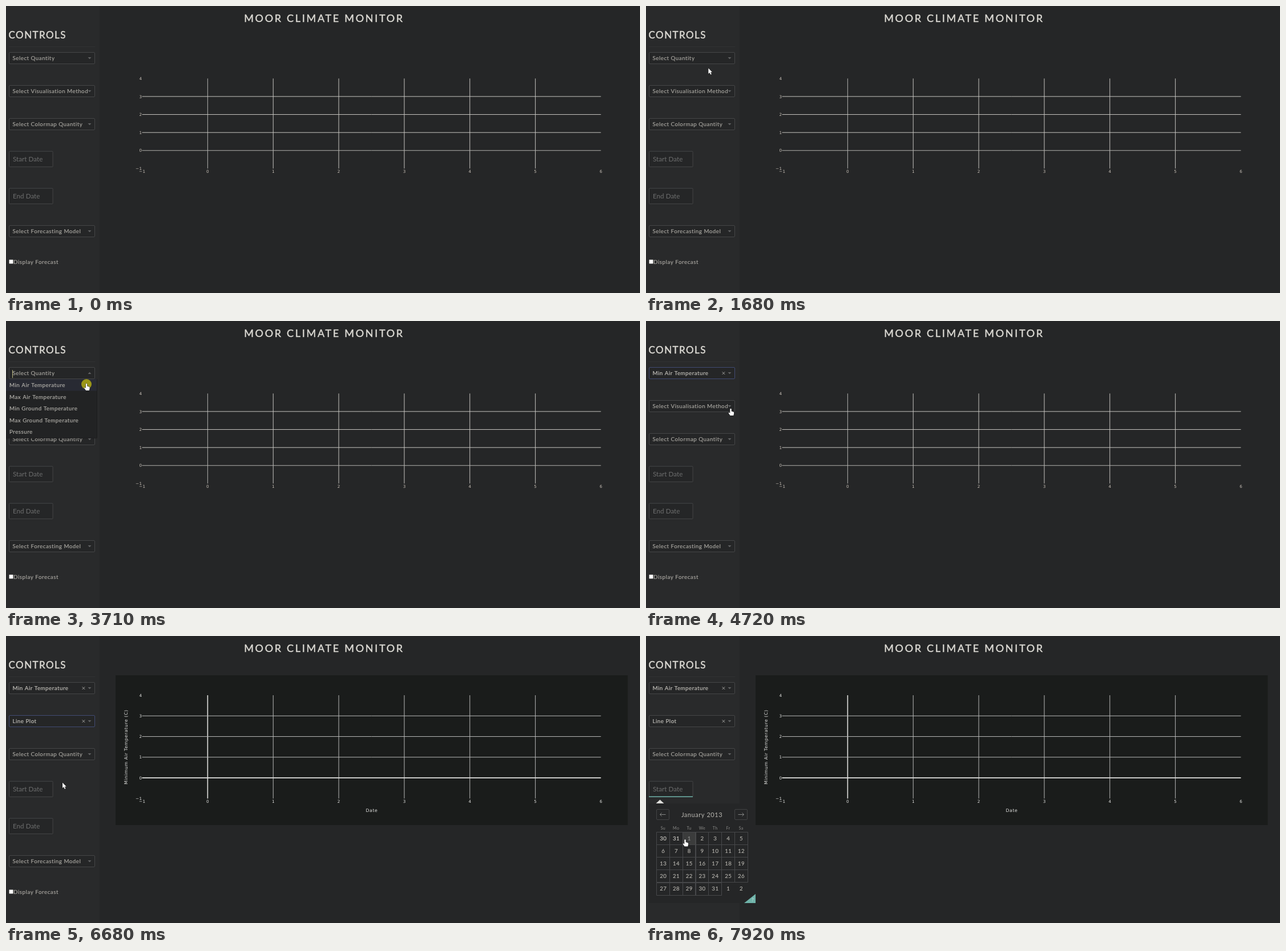
An HTML page with a canvas that plays this animation: 1111 px wide and 504 px high, repeating every 8 s.

```html
<!DOCTYPE html>
<html lang="en">
<head>
<meta charset="utf-8">
<title>Moor Climate Monitor</title>
<style>
  html, body { margin: 0; width: 100%; height: 100%; overflow: hidden; background: #252627; }
  canvas { display: block; width: 1111px; height: 504px; }
</style>
</head>
<body>
<canvas id="stage"></canvas>
<script>
const W = 1111, H = 504, LOOP = 8000;
const canvas = document.getElementById('stage');
const ctx = canvas.getContext('2d');
const dpr = window.devicePixelRatio || 1;
canvas.width = W * dpr;
canvas.height = H * dpr;

const UI = 'Lato, sans-serif';
const PLOT = '"DejaVu Sans", Verdana, sans-serif';
const SIDE = '#292a2b', MAIN = '#252627', EDGE = '#454647';
const SOFT = '#aba9a3', BRIGHT = '#c6c4be', TEAL = '#6fb3a9';

// The screen updates in beats: beat 0 at 510 ms, one every 78 ms.
const beatAt = t => Math.floor((t - 510) / 78 + 0.2);
const within = (k, a, b) => k >= a && k < b;

// Pointer keys: beat, x, y, shape from that beat on
const PATH = [
  [0, 1096, 488, 'arrow'], [2, 800, 385, 'arrow'], [4, 410, 300, 'arrow'],
  [5, 256.5, 276.5, 'cross'], [6, 168, 236, 'arrow'], [8, 52, 162, 'arrow'],
  [9, 24, 143, 'arrow'], [10, 29, 137, 'arrow'], [14, 92, 116, 'arrow'],
  [17, 144, 96, 'hand'], [18, 151, 93, 'hand'], [34, 151, 93, 'hand'],
  [37, 141, 110, 'hand'], [42, 141, 110, 'arrow'], [47, 141, 110, 'arrow'],
  [51, 146, 132, 'arrow'], [53, 148, 149, 'hand'], [54, 148.5, 154, 'hand'],
  [61, 148.5, 154, 'hand'], [66, 133, 171, 'hand'], [69, 132.5, 171, 'arrow'],
  [75, 132.5, 171, 'arrow'], [79, 99, 257.5, 'arrow'], [81, 68, 263, 'beam'],
  [82, 61, 263, 'beam'], [87, 61, 263, 'beam'], [89, 58, 284, 'arrow'],
  [93, 64, 340, 'arrow'], [94, 67, 352, 'hand'], [95, 68.5, 357.5, 'hand']
];
const CLICKS = [[24, 27, 150, 92.5], [41, 43, 141, 111], [55, 56, 148.5, 155],
  [68, 70, 133, 172], [84, 86, 61, 263]];

const HAND = new Path2D('M-1.2 .6Q0-.9 1.2 .6V4.6L4.6 5.4Q6 6 5.7 8L4.8 12H-.9L-3.8 8Q-4 6.6-2.6 6.8L-1.2 8Z');
const ARROW = new Path2D('M0 0V9.6L2.2 7.6 3.8 11.2 5.5 10.4 3.9 7H6.8Z');

function rect(x, y, w, h, fill) {
  ctx.fillStyle = fill;
  ctx.fillRect(x, y, w, h);
}

function frame(x, y, w, h, stroke, fill, r = 0) {
  ctx.beginPath();
  ctx.roundRect(x + 0.5, y + 0.5, w - 1, h - 1, r);
  if (fill) { ctx.fillStyle = fill; ctx.fill(); }
  ctx.strokeStyle = stroke;
  ctx.lineWidth = 1;
  ctx.stroke();
}

function lines(color, width, ...segments) {
  ctx.beginPath();
  for (const [x1, y1, x2, y2] of segments) {
    ctx.moveTo(x1, y1);
    ctx.lineTo(x2, y2);
  }
  ctx.strokeStyle = color;
  ctx.lineWidth = width;
  ctx.stroke();
}

function shape(fill, ...points) {
  ctx.beginPath();
  points.forEach(([x, y]) => ctx.lineTo(x, y));
  ctx.closePath();
  ctx.fillStyle = fill;
  ctx.fill();
}

// y is the middle of the capitals; heft thickens the strokes slightly
function text(str, x, y, { size = 9.8, color = SOFT, gap = 0.49, align = 'left', font = UI, heft = 0 } = {}) {
  ctx.font = `${size}px ${font}`;
  ctx.letterSpacing = gap + 'px';
  ctx.textAlign = align;
  ctx.fillStyle = ctx.strokeStyle = color;
  ctx.fillText(str, x, y + size * 0.36);
  if (!heft) return;
  ctx.lineWidth = heft;
  ctx.lineJoin = 'round';
  ctx.strokeText(str, x, y + size * 0.36);
}

function select(y, label, { value, focus, open } = {}) {
  frame(5, y, 151, 21, focus ? '#414b73' : EDGE, MAIN, 1.5);
  text(value || label, 11.5, y + 10.5, { color: value ? BRIGHT : SOFT, heft: 0.15 });
  const d = open ? -1 : 1, cy = y + 10.5;
  shape('#626364', [143.5, cy - 1.5 * d], [149.5, cy - 1.5 * d], [146.5, cy + 1.7 * d]);
  if (value) {
    lines('#a5a5a2', 1, [133.6, cy - 2.2, 138.2, cy + 2.4], [138.2, cy - 2.2, 133.6, cy + 2.4]);
  }
}

function menu(y, items) {
  const step = 20.45, h = items.length * step + 1;
  rect(0, y, 159, h, '#222324');
  rect(0, y, 159, step, '#282a33');
  lines('#1c1d1e', 1, [0, y + h + 0.5, 159, y + h + 0.5], [159.5, y, 159.5, y + h]);
  items.forEach((item, i) => text(item, 6, y + 10.8 + i * step, { color: '#b4b2ac', heft: 0.15 }));
}

function dateBox(y, label, active) {
  frame(5, y - 0.3, 77.6, 28.2, EDGE, MAIN, 1);
  text(label, 12, y + 13.8, { size: 11.7, gap: 0, color: '#6d6e6e' });
  if (active) rect(5, y + 26.5, 77, 1.5, TEAL);
}

function plot(active) {
  const top = active ? 104 : 127.3, bottom = 285.4;
  const left = 238.5, dx = 114.86, dy = (bottom - top) / 5;
  const grid = active ? '#b9bab9' : '#c8c7c2';
  const zero = active ? '#e2e2e0' : '#b3b2ae';
  const tick = { size: 7.2, gap: 0.4, font: PLOT, color: active ? '#e2e2e0' : '#c9c1b8' };
  const name = n => String(n).replace('-', '\u2212');
  const zeroWidth = active ? 1.6 : 1;

  if (active) rect(192, 69, 897.5, 263, '#1a1c1b');
  for (let n = -1; n <= 6; n++) {
    const x = left + (n + 1) * dx;
    if (n > -1 && n < 6) lines(n ? grid : zero, n ? 1 : zeroWidth, [x, top, x, bottom]);
    text(name(n), x + 0.2, 290.5, { ...tick, align: 'center' });
  }
  for (let n = -1; n <= 4; n++) {
    const y = bottom - (n + 1) * dy;
    if (n > -1 && n < 4) lines(n ? grid : zero, n ? 1 : zeroWidth, [left, y, 1042.5, y]);
    text(name(n), 238.4, y, { ...tick, align: 'right' });
  }
  if (!active) return;
  const title = { ...tick, size: 7.8, gap: 0.6, align: 'center' };
  text('Date', 641, 306.5, title);
  ctx.save();
  ctx.translate(210, 195);
  ctx.rotate(-Math.PI / 2);
  text('Minimum Air Temperature (C)', 0, 0, title);
  ctx.restore();
}

function toolbar(alpha) {
  if (alpha <= 0) return;
  const dim = '#38393a', lens = '#5c5d5d', y = 78;
  ctx.save();
  ctx.globalAlpha = alpha;
  // camera
  rect(964.5, 75.5, 9, 6.5, dim);
  rect(967, 74, 4, 2, dim);
  ctx.beginPath();
  ctx.arc(969, 78.7, 1.8, 0, 7);
  ctx.fillStyle = MAIN;
  ctx.fill();
  // magnifier
  ctx.beginPath();
  ctx.arc(986.3, 77.3, 3, 0, 7);
  ctx.strokeStyle = lens;
  ctx.lineWidth = 1.4;
  ctx.stroke();
  lines(lens, 1.6, [988.5, 79.5, 991.5, 82.5]);
  lines(lens, 1, [984.8, 77.3, 987.8, 77.3], [986.3, 75.8, 986.3, 78.8]);
  // pan
  lines(dim, 1.3, [997, y, 1006, y], [1001.5, 73.5, 1001.5, 82.5]);
  // zoom in and out
  for (const x of [1020, 1034]) {
    rect(x - 4, 74, 8, 8, dim);
    lines(MAIN, 1.2, [x - 2.5, y, x + 2.5, y]);
  }
  lines(MAIN, 1.2, [1020, 75.5, 1020, 80.5]);
  // autoscale
  lines(dim, 1.3, [1044.5, 74, 1052.5, 82], [1052.5, 74, 1044.5, 82]);
  // home
  shape(dim, [1058, 78.3], [1062.5, 74], [1067, 78.3], [1065.7, 78.3], [1065.7, 82], [1059.3, 82], [1059.3, 78.3]);
  rect(1076.5, 73.5, 9, 9, '#737474');
  ctx.restore();
}

function calendar(k) {
  const x0 = 18.5, y0 = 344.5, cw = 22.8, ch = 22.15;
  const mid = c => x0 + (c + 0.5) * cw;
  rect(5, 294, 187, 175, MAIN);
  shape('#dededb', [17.5, 294], [24.5, 287.5], [31.5, 294]);

  for (const [x, d] of [[18, -1], [155, 1]]) {
    frame(x, 304, 23, 19, '#424344', null, 1.5);
    const c = x + 11.5, tip = c + 5 * d;
    lines('#858685', 1, [c - 5 * d, 313.5, tip, 313.5],
      [tip, 313.5, tip - 3 * d, 310.5], [tip, 313.5, tip - 3 * d, 316.5]);
  }
  text('January 2013', 98, 314, { size: 11, gap: 0.55, align: 'center', color: '#b8b6b0' });
  ['Su', 'Mo', 'Tu', 'We', 'Th', 'Fr', 'Sa'].forEach((d, c) =>
    text(d, mid(c), 337, { size: 7, gap: 0.4, align: 'center', color: '#8a8a88' }));

  for (let i = 0; i < 35; i++) {
    const c = i % 7, r = Math.floor(i / 7);
    const day = i < 2 ? 30 + i : (i - 2) % 31 + 1;
    const x = Math.floor(x0 + c * cw), y = Math.floor(y0 + r * ch);
    const hover = i === 2 && k >= 94;
    if (i < 33) frame(x, y, 24, 23, '#47484a', hover ? '#3b3c3c' : null);
    text(day, mid(c) + 0.3, y0 + (r + 0.5) * ch - 0.3, {
      size: 9.6, gap: 0.5, align: 'center', heft: 0.15,
      color: i < 2 ? '#d0cec8' : hover ? '#8f908e' : '#b4b2ac'
    });
  }
  shape(TEAL, [192, 453], [192, 469], [172, 469]);
  text('?', 187, 463.3, { size: 8, gap: 0, align: 'center', color: '#dce8e5' });
}

function pointer(k) {
  if (k < 0) return;
  let i = PATH.length - 1;
  while (PATH[i][0] > k) i--;
  const a = PATH[i], b = PATH[i + 1] || a;
  const p = b === a ? 0 : (k - a[0]) / (b[0] - a[0]);
  const x = a[1] + (b[1] - a[1]) * p, y = a[2] + (b[2] - a[2]) * p;

  ctx.save();
  ctx.translate(x, y);
  if (a[3] === 'cross') {
    lines('#f2f2f2', 1.5, [-7, 0, 7, 0], [0, -7, 0, 7]);
  } else if (a[3] === 'beam') {
    lines('#f2f2f2', 1, [0, -5.5, 0, 5.5], [-2.5, -5.5, 2.5, -5.5], [-2.5, 5.5, 2.5, 5.5]);
  } else {
    const path = a[3] === 'hand' ? HAND : ARROW;
    ctx.strokeStyle = '#151515';
    ctx.lineWidth = 1;
    ctx.stroke(path);
    ctx.fillStyle = '#fff';
    ctx.fill(path);
  }
  ctx.restore();
}

function draw(k) {
  const open1 = within(k, 25, 42), open2 = within(k, 55, 69), picking = k >= 85;
  ctx.setTransform(dpr, 0, 0, dpr, 0, 0);
  rect(0, 0, W, H, MAIN);
  rect(0, 0, 164, H, SIDE);

  const heading = { color: '#dbd9d3', heft: 0.45 };
  text('MOOR CLIMATE MONITOR', 557.5, 21.5, { ...heading, size: 18, gap: 2.7, align: 'center' });
  text('CONTROLS', 4.5, 51, { ...heading, size: 17, gap: 1.45 });
  rect(5, 71, 151, 1, '#313233');

  plot(k >= 71);
  toolbar(k < 6 ? Math.min(1, (k - 1) / 3) : 1 - (k - 5) / 4);

  select(81, 'Select Quantity', { value: k >= 42 && 'Min Air Temperature', focus: within(k, 42, 55), open: open1 });
  select(139, 'Select Visualisation Method', { value: k >= 69 && 'Line Plot', focus: within(k, 69, 85), open: open2 });
  select(197, 'Select Colormap Quantity');
  dateBox(255, 'Start Date', picking);
  dateBox(320, 'End Date');
  select(385, 'Select Forecasting Model');
  frame(5, 445, 8, 8, '#8a8a8a', '#fff', 1);
  text('Display Forecast', 13, 449.5, { gap: 0.53, heft: 0.15 });

  if (open1) menu(102, ['Min Air Temperature', 'Max Air Temperature', 'Min Ground Temperature', 'Max Ground Temperature', 'Pressure']);
  if (open2) menu(160, ['Line Plot', 'Scatter Plot']);
  if (picking) calendar(k);

  // blinking text carets
  if (within(k, 25, 32) || within(k, 39, 42)) rect(11, 86, 1, 14, '#b5b27c');
  if (within(k, 55, 62) || k === 68) rect(11, 144, 1, 14, '#b5b3ad');
  if (within(k, 85, 91)) rect(12, 262, 1, 14, '#b5b3ad');

  for (const [from, to, x, y] of CLICKS) {
    if (!within(k, from, to)) continue;
    ctx.beginPath();
    ctx.arc(x, y, 9, 0, Math.PI * 2);
    ctx.fillStyle = 'rgba(180, 174, 18, 0.82)';
    ctx.fill();
  }
  pointer(k);
}

function tick() {
  draw(beatAt(performance.now() % LOOP));
  requestAnimationFrame(tick);
}
tick();
</script>
</body>
</html>
```
